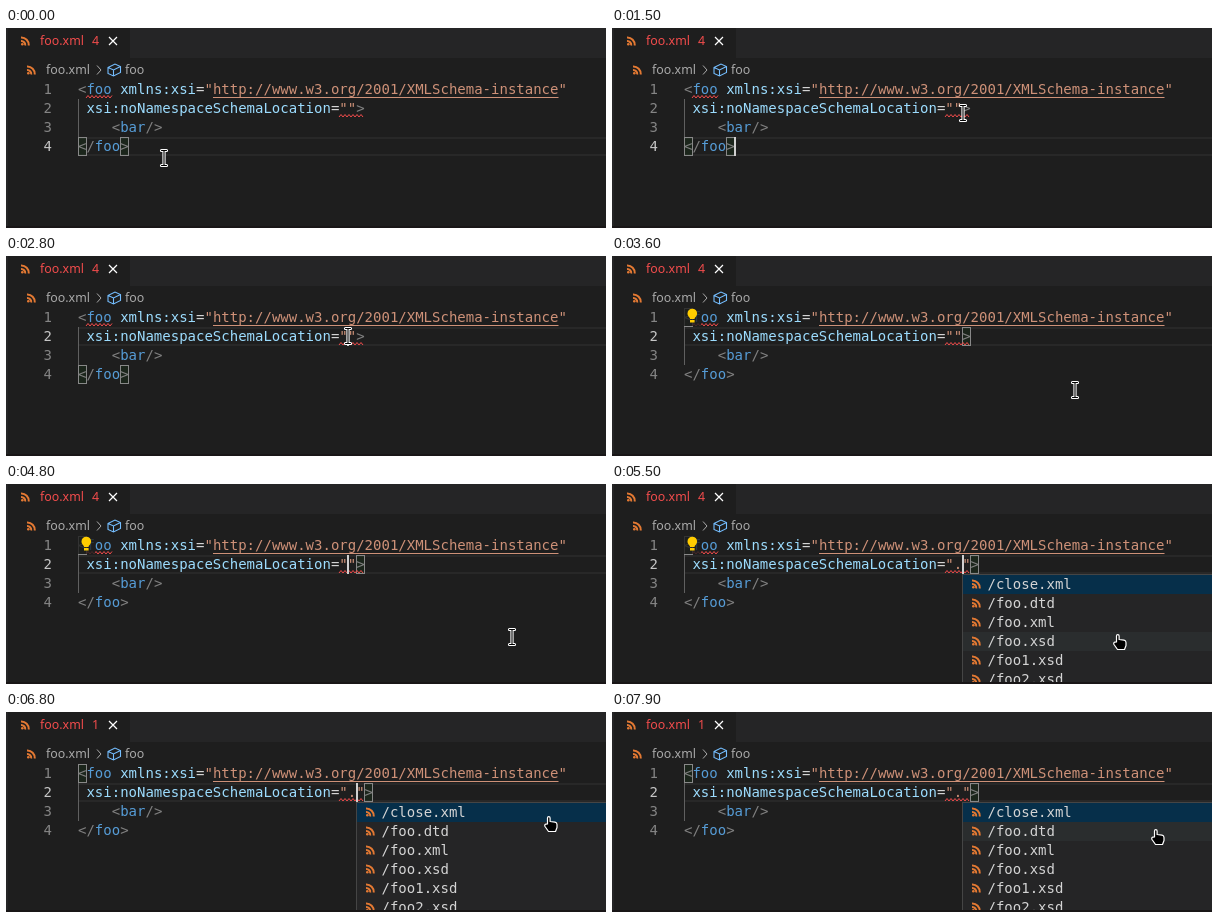
Animation, 600 px wide and 200 px high, one loop 8000 ms. Source, as an HTML page:

```html
<!DOCTYPE html>
<html lang="en">
<head>
<meta charset="utf-8">
<title>XML editor</title>
<style>
  html, body { margin: 0; width: 100%; height: 100%; overflow: hidden; background: #1e1e1e; }
  svg { display: block; width: 600px; height: 200px; }
  text { white-space: pre; fill: #d4d4d4; }
  .code text { font: 14px "DejaVu Sans Mono", monospace; }
  .ui text { font: 12.4px "Noto Sans", "Open Sans", sans-serif; }
  .ui .crumb { fill: #a9a9a9; }
  .ui .error { fill: #f14c4c; }
  .punct { fill: #808080; }
  .tag { fill: #569cd6; }
  .attr { fill: #9cdcfe; }
  .str { fill: #ce9178; }
  .number { fill: #858585 !important; }
  .number.active { fill: #c6c6c6 !important; }
  .squiggle { fill: none; stroke: #f14c4c; }
  .bracket { fill: #006400; fill-opacity: .1; stroke: #888; }
  .line { fill: none; }
  .pointer path { stroke-linejoin: round; stroke-linecap: round; }
</style>
</head>
<body>
<svg viewBox="0 0 600 200">
  <defs>
    <g id="feed" fill="none" stroke="#e37933" stroke-width="2">
      <path d="M-4 -3.5A7.5 7.5 0 0 1 3.8 4.5M-4 0A4 4 0 0 1 .2 4.5"/>
      <circle cx="-2.7" cy="3.2" r="1.3" fill="#e37933" stroke="none"/>
    </g>
  </defs>
  <rect width="600" height="200" fill="#1e1e1e"/>

  <g class="ui">
    <rect x="124" width="476" height="30" fill="#252526"/>
    <rect width="2" height="200" fill="#252526"/>
    <use href="#feed" x="19" y="13"/>
    <text x="34" y="17" class="error">foo.xml</text>
    <text x="86" y="17" class="error" id="count"></text>
    <path d="M103 9l8 8m0-8l-8 8" stroke="#fff" stroke-width="1.2"/>
    <use href="#feed" x="25" y="42"/>
    <text x="40" y="46" class="crumb">foo.xml</text>
    <path d="M91 37.5l4 4.5l-4 4.5" fill="none" stroke="#a9a9a9"/>
    <path d="M102 39.5l7-3.5l5.5 2.5v6l-7 3.500l-5.500-2.500zl5.500 2.500l7-3.500m-7 3.500v6" fill="none" stroke="#75beff" stroke-width="1.1"/>
    <text x="119" y="46" class="crumb">foo</text>
  </g>

  <g class="code">
    <path id="lineHighlight" d="M72 1H600M72 18H600" stroke="#282828" stroke-width="2"/>
    <path d="M72.500 71V109" stroke="#606060"/>
    <g id="numbers"></g>
    <rect class="bracket" id="open" width="8" height="18"/>
    <rect class="bracket" id="close" width="8" height="18"/>
    <text x="72" y="66"><tspan class="punct">&lt;</tspan><tspan class="tag">foo</tspan> <tspan class="attr">xmlns:xsi</tspan>=<tspan class="str">"http://www.w3.org/2001/XMLSchema-instance"</tspan></text>
    <rect x="207" y="69" width="345.500" height="1" fill="#ce9178"/>
    <text x="72" y="85"> <tspan class="attr">xsi:noNamespaceSchemaLocation</tspan>=<tspan class="str" id="location"></tspan><tspan class="punct">&gt;</tspan></text>
    <text x="72" y="104">    <tspan class="punct">&lt;</tspan><tspan class="tag">bar</tspan><tspan class="punct">/&gt;</tspan></text>
    <text x="72" y="123"><tspan class="punct">&lt;/</tspan><tspan class="tag">foo</tspan><tspan class="punct">&gt;</tspan></text>
    <path class="squiggle" id="tagError"/>
    <path class="squiggle" id="valueError"/>
    <g id="bulb">
      <rect x="72" y="52" width="17" height="18" fill="#1e1e1e" opacity=".8"/>
      <path d="M78 63C78 61 75.500 60.500 75.500 57.500A4.800 4.800 0 0 1 85.100 57.500C85.100 60.500 82.600 61 82.600 63zM78 64h4.600v2.500h-4.600z" fill="#fc0"/>
    </g>
    <rect id="caret" width="2" height="19" fill="#d0d0d0"/>
    <g id="popup">
      <rect x="350.500" y="90.500" width="260" height="120" fill="#252526" stroke="#454545"/>
      <rect id="hover" x="351" width="249" height="19" fill="#2a2d2e"/>
      <rect x="351" y="91" width="249" height="19" fill="#062f4a"/>
      <g id="items"></g>
    </g>
  </g>
  <rect y="198" width="600" height="2" fill="#191617"/>

  <g class="pointer" id="pointer">
    <g id="beam" fill="none">
      <path d="M-2.500-7.500H2.500M0-7.500V7.500M-2.500 7.500H2.500" stroke="#fff" stroke-width="3.200"/>
      <path d="M-2.500-7.500H2.500M0-7.500V7.500M-2.500 7.500H2.500" stroke="#000" stroke-width="1.100"/>
    </g>
    <path id="hand" d="M-1.500 5V-1Q-1.500-2.300-.2-2.300T1.100-1V2.500L6 3.200Q8 3.700 8 5.500V8.500L6.500 12.500H-.5L-4 7.500Q-4.800 5.500-3.200 5.200Z" fill="#000" stroke="#fff" stroke-width="1.200"/>
  </g>
</svg>
<script>
  const LOOP = 8000, STEP = 100, ROW = 19, TOP = 52, LEFT = 72, CHAR = 8.428;
  const CLICK = 2800, TYPE = 5400, SUGGEST = 5500, VALIDATE = 5600;
  const files = ["/close.xml", "/foo.dtd", "/foo.xml", "/foo.xsd", "/foo1.xsd", "/foo2.xsd"];

  // Pointer moves: start, end, target x, target y
  const start = [158, 130];
  const moves = [
    [700, 1500, 351, 85],
    [1600, 2300, 342, 80],
    [3000, 3900, 506, 153],
    [6000, 6800, 543, 107],
    [6900, 7000, 542, 106],
    [7600, 7900, 544, 120],
  ];

  const el = id => document.getElementById(id);
  const show = (id, on) => el(id).setAttribute("visibility", on ? "visible" : "hidden");
  const place = (id, x, y) => el(id).setAttribute("transform", `translate(${x} ${y})`);
  const column = n => LEFT + n * CHAR;
  const rowTop = n => TOP + (n - 1) * ROW;

  function squiggle(from, to, y) {
    let d = `M${from} ${y}`;
    for (let x = from + 2, up = true; x <= to; x += 2, up = !up) d += `L${x} ${up ? y - 2.5 : y}`;
    return d;
  }

  function placeBracket(id, col, row) {
    place(id, Math.floor(column(col)) + .5, rowTop(row) + .5);
  }

  function pointerAt(t) {
    let [x, y] = start;
    for (const [from, to, toX, toY] of moves) {
      const p = Math.min(1, Math.max(0, (t - from) / (to - from)));
      const eased = p * p * (3 - 2 * p);
      x += (toX - x) * eased;
      y += (toY - y) * eased;
    }
    return [Math.round(x), Math.round(y)];
  }

  function caretOn(t) {
    const since = t >= TYPE ? TYPE : t >= CLICK ? CLICK : 400;
    return Math.floor((t - since) / 500) % 2 === 0;
  }

  function render(t) {
    const clicked = t >= CLICK, typed = t >= TYPE, listed = t >= SUGGEST, valid = t >= VALIDATE;
    const row = clicked ? 2 : 4;
    const [x, y] = pointerAt(t);

    el("count").textContent = valid ? "1" : "4";
    el("location").textContent = typed ? '"."' : '""';
    [...el("numbers").children].forEach((n, i) => n.classList.toggle("active", i + 1 === row));
    place("lineHighlight", 0, rowTop(row));

    const enclosing = t >= CLICK + STEP;
    placeBracket("open", 0, enclosing ? 1 : 4);
    placeBracket("close", enclosing ? (typed ? 34 : 33) : 5, enclosing ? 2 : 4);

    show("tagError", !valid);
    show("bulb", t >= 3300 && t < 5900);
    show("caret", caretOn(t));
    place("caret", Math.floor(column(typed ? 33 : clicked ? 32 : 6)), rowTop(row));

    el("popup").style.display = listed ? "" : "none";
    place("hover", 0, 91 + Math.floor((y - 91) / ROW) * ROW);

    show("beam", !listed);
    show("hand", listed);
    place("pointer", x, y);
  }

  el("numbers").innerHTML = [1, 2, 3, 4]
    .map(n => `<text class="number" x="37.6" y="${rowTop(n) + 14}">${n}</text>`).join("");
  el("items").innerHTML = files.map((name, i) =>
    `<use href="#feed" x="364" y="${100 + i * ROW}"/><text x="375.5" y="${105 + i * ROW}">${name}</text>`).join("");
  el("tagError").setAttribute("d", squiggle(80, 106, 70));
  el("valueError").setAttribute("d", squiggle(333, 358, 89));

  const begin = performance.now();
  function tick() {
    const t = (performance.now() - begin) % LOOP;
    render(Math.floor(t / STEP) * STEP);
    requestAnimationFrame(tick);
  }
  tick();
</script>
</body>
</html>
```
